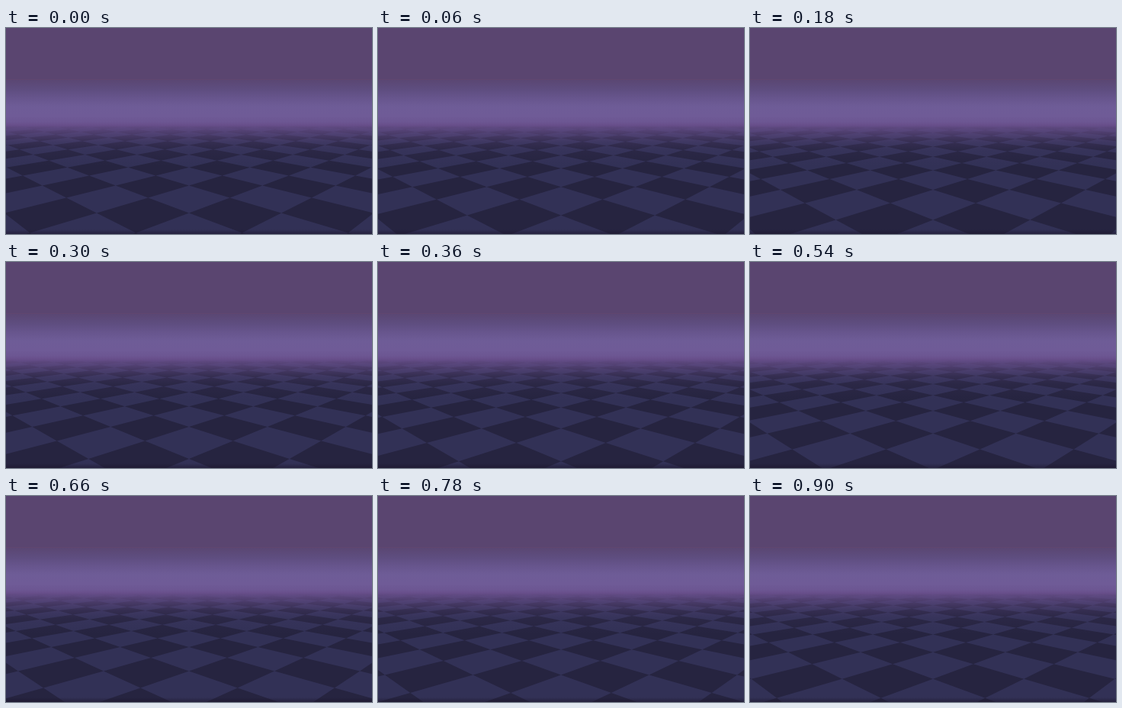
An HTML page with a canvas that plays this animation: 480x270 px, repeating every 0.96 s.

```html
<!DOCTYPE html>
<html lang="en">
<head>
<meta charset="utf-8">
<title>Checkered floor</title>
<style>
  html, body { margin: 0; width: 100%; height: 100%; overflow: hidden; background: #5a4570; }
  canvas { display: block; width: 480px; height: 270px; }
</style>
</head>
<body>
<canvas id="stage" width="480" height="270"></canvas>
<script>
const ctx = document.getElementById('stage').getContext('2d');
const W = 480, H = 270, CENTER = 240, HORIZON = 67.5;
const LOOP = 960, STEP = 60;
const HALF_X = 0.346;      // half a tile diagonal, sideways
const HALF_Z = 0.00074;    // half a tile diagonal, in depth
const NEAR_Z = 0.005714;   // depth of the first row at loop start

function gradient(top, bottom, stops) {
  const g = ctx.createLinearGradient(0, top, 0, bottom);
  for (const [y, color] of stops) g.addColorStop((y - top) / (bottom - top), color);
  return g;
}

const haze = gradient(67, 127, [
  [67, '#5a4672'], [80, '#5e4d7f'], [92, '#67558d'],
  [103, '#6e5c97'], [115, '#6f5b97'], [123, '#6c5692'], [127, '#684f8b']
]);
const fogAt = a => `rgba(104, 79, 139, ${a})`;
const fog = gradient(127, 180, [
  [127, fogAt(1)], [131, fogAt(0.8)], [140, fogAt(0.5)],
  [150, fogAt(0.22)], [160, fogAt(0.08)], [180, fogAt(0)]
]);
const foot = gradient(264, 270, [[264, 'rgba(28, 22, 44, 0)'], [270, 'rgba(28, 22, 44, 0.6)']]);

function fillBand(style, top, bottom) {
  ctx.fillStyle = style;
  ctx.fillRect(0, top, W, bottom - top);
}

// Perspective projection of a floor point.
const project = (x, z) => [CENTER + x * HALF_X / z, HORIZON + 1 / z];

function drawTiles(phase) {
  ctx.fillStyle = '#262440';
  ctx.beginPath();
  for (let row = -1; row < 11; row++) {
    const z = NEAR_Z + 2 * HALF_Z * (row - phase);
    for (let x = -15; x <= 15; x += 2) {
      ctx.moveTo(...project(x - 1, z));
      ctx.lineTo(...project(x, z + HALF_Z));
      ctx.lineTo(...project(x + 1, z));
      ctx.lineTo(...project(x, z - HALF_Z));
      ctx.closePath();
    }
  }
  ctx.fill();
}

function draw(time) {
  const phase = Math.floor((time % LOOP) / STEP) * STEP / LOOP;
  fillBand('#323156', 127, H);
  drawTiles(phase);
  fillBand(fog, 127, 180);
  fillBand(foot, 264, H);
  fillBand('#5a4570', 0, 67);
  fillBand(haze, 67, 127);
  fillBand('#61466f', 67, 68);
}

const start = performance.now();
function tick() {
  draw(performance.now() - start);
  requestAnimationFrame(tick);
}
tick();
</script>
</body>
</html>
```
